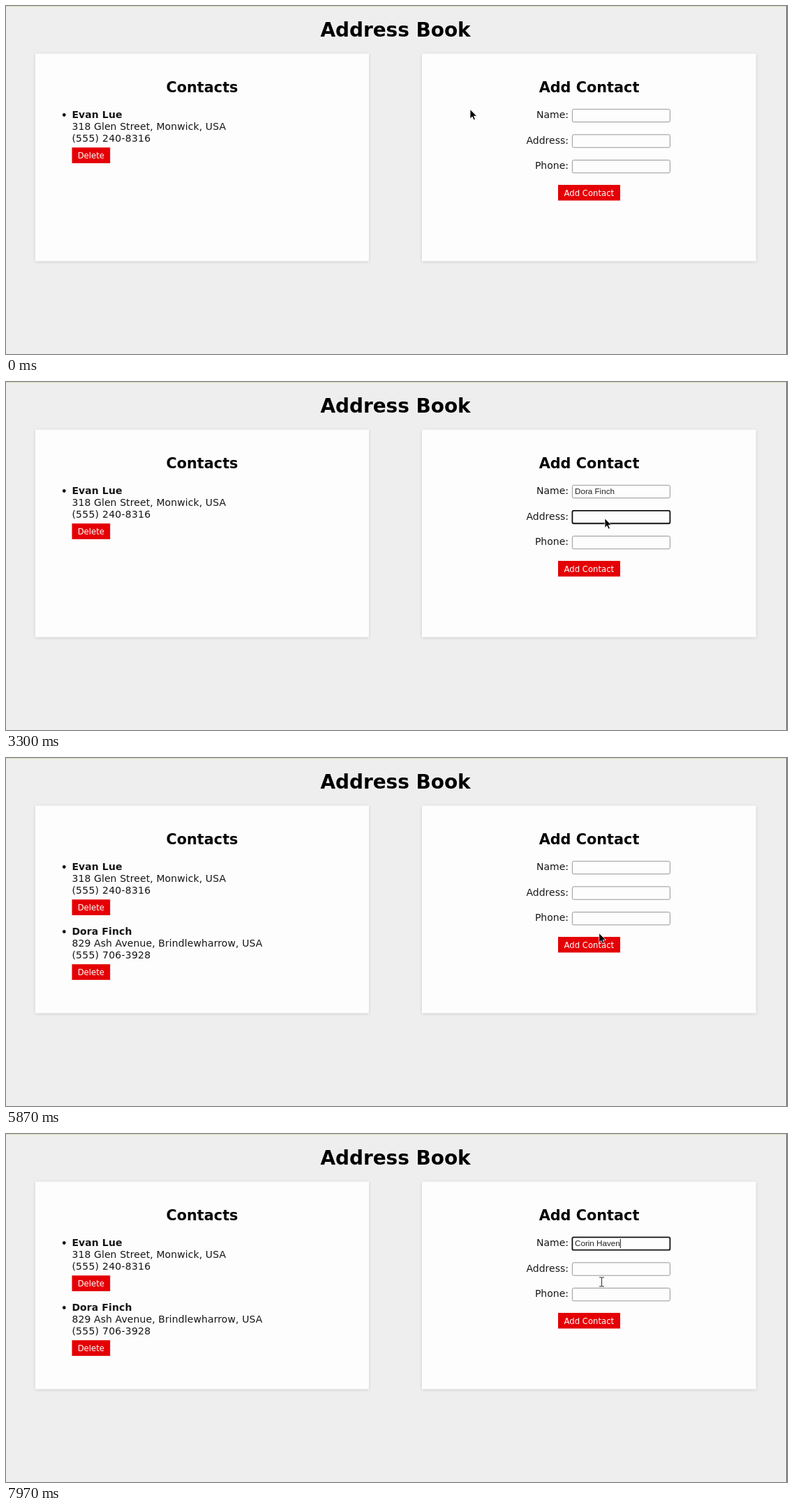
Write an HTML page that moves like this. It is 1119 by 500 pixels and loops after 8000 ms.

```html
<!DOCTYPE html>
<html lang="en">
<head>
<meta charset="utf-8">
<title>Address Book</title>
<style>
  html, body { margin: 0; width: 100%; height: 100%; overflow: hidden; background: #eee; }
  svg { display: block; width: 1119px; height: 500px; }
  text { font: 14px Verdana, "DejaVu Sans", sans-serif; fill: #161616; white-space: pre; }
  .h1 { font-size: 27.9px; font-weight: bold; fill: #000; text-anchor: middle; }
  .h2 { font-size: 20.8px; font-weight: bold; fill: #050505; text-anchor: middle; }
  .name { font-weight: bold; letter-spacing: .1px; }
  .street { letter-spacing: .1px; }
  .phone { letter-spacing: .25px; }
  .label { text-anchor: end; }
  .btn rect { fill: #e40005; }
  .btn text { font-size: 11.67px; fill: #fff; text-anchor: middle; }
  .card { fill: #fdfdfd; filter: drop-shadow(0 1.5px 2px rgba(0, 0, 0, .12)); }
  .box { fill: #fdfdfd; stroke: #8c8c90; stroke-width: .9; }
  .box.focus { stroke: #111; stroke-width: 1.8; }
  .value { font: 11.667px Arial, "Liberation Sans", sans-serif; fill: #222; }
</style>
</head>
<body>
<svg viewBox="0 0 1119 500">
  <defs>
    <clipPath id="inner"><rect x="814" y="140" width="134" height="110"/></clipPath>
  </defs>
  <rect width="1119" height="1" fill="#d8dbb6"/>
  <rect x="1118" width="1" height="500" fill="#5a5a5a"/>
  <text class="h1" x="558" y="44">Address Book</text>

  <rect class="card" x="42" y="68.5" width="478" height="298"/>
  <rect class="card" x="596" y="68.5" width="478.5" height="298"/>
  <text class="h2" x="281" y="124.3">Contacts</text>
  <text class="h2" x="835.5" y="124.3">Add Contact</text>

  <g id="list"></g>
  <g id="form"></g>
  <g class="btn"><rect x="791" y="257" width="89" height="22.5"/><text x="835.3" y="272.7">Add Contact</text></g>

  <rect id="caret" width="1" height="13" fill="#111"/>
  <path id="arrow" d="M0 0V13.4L3.1 10.6L5.2 15.2L7.4 14.2L5.3 9.7H9.6Z" fill="#000" stroke="#fff" stroke-width=".8"/>
  <path id="beam" d="M-3.5-6.5H-1L0-5.7L1-6.5H3.5M0-5.7V5.7M-3.5 6.5H-1L0 5.7L1 6.5H3.5" fill="none" stroke="#3a3a3a" stroke-width="1.1"/>
</svg>
<script>
const LOOP = 8000, SUBMIT = 5700, BEAM_FROM = 6120, BLINK = 500;
const $ = id => document.getElementById(id);

const contacts = [
  { name: "Evan Lue", street: "318 Glen Street, Monwick, USA", phone: "(555) 240-8316" },
  { name: "Dora Finch", street: "829 Ash Avenue, Brindlewharrow, USA", phone: "(555) 706-3928" }
];
const [, added] = contacts;

// Typed entries: field, text, first key, last key, cleared at
const entries = [
  { field: 0, text: added.name, from: 1980, to: 2550, until: SUBMIT },
  { field: 1, text: added.street, from: 3350, to: 4000, until: SUBMIT },
  { field: 2, text: added.phone, from: 4250, to: 4950, until: SUBMIT },
  { field: 0, text: "Corin Haven", from: 6950, to: 7650, until: LOOP }
];

// Focus changes: time, field (-1 for none)
const focuses = [[0, -1], [1400, 0], [2750, 1], [4130, 2], [SUBMIT, -1], [6200, 0]];

// Pointer path: time, x, y
const path = [
  [0, 665, 148.5], [250, 665, 148.5], [670, 669, 148.5], [800, 671, 148.5],
  [1350, 829.5, 153.5], [2500, 829.5, 153.5], [2720, 858, 196], [3950, 858, 196],
  [4110, 862, 232], [4950, 862, 232], [5330, 863.5, 250], [5600, 850, 263],
  [5800, 850, 263], [6150, 848, 157], [6250, 848, 157], [6470, 849.5, 173.5],
  [7000, 853.5, 212.5], [LOOP, 853.5, 212.5]
];

$("list").innerHTML = contacts.map((c, i) => `
  <g id="contact${i}" transform="translate(0 ${i * 93})">
    <circle cx="83.3" cy="156.5" r="2.4" fill="#111"/>
    <text class="name" x="94.4" y="161">${c.name}</text>
    <text class="street" x="94.4" y="178">${c.street}</text>
    <text class="phone" x="94.4" y="194.8">${c.phone}</text>
    <g class="btn"><rect x="94.5" y="203.3" width="54.7" height="22.5"/><text x="121.8" y="219.3">Delete</text></g>
  </g>`).join("");

const rowY = i => 148.3 + i * 36.55;
$("form").innerHTML = ["Name:", "Address:", "Phone:"].map((label, i) => `
  <text class="label" x="806" y="${rowY(i) + 12.7}">${label}</text>
  <rect class="box" x="811.4" y="${rowY(i)}" width="140" height="18.4" rx="2"/>
  <g clip-path="url(#inner)"><text class="value" x="815" y="${rowY(i) + 12.8}"></text></g>`).join("");
const boxes = document.querySelectorAll(".box");
const values = document.querySelectorAll(".value");

function pointerAt(t) {
  const i = Math.max(1, path.findIndex(p => p[0] >= t));
  const [t0, x0, y0] = path[i - 1], [t1, x1, y1] = path[i];
  const u = (t - t0) / (t1 - t0), k = u * u * (3 - 2 * u);
  return [x0 + (x1 - x0) * k, y0 + (y1 - y0) * k];
}

function typed(field, t) {
  const e = entries.find(e => e.field === field && t >= e.from && t < e.until);
  if (!e) return "";
  const u = Math.min(1, (t - e.from) / (e.to - e.from));
  return e.text.slice(0, 1 + Math.floor(u * (e.text.length - 1)));
}

function draw(t) {
  const [since, focus] = focuses.filter(f => f[0] <= t).pop();
  $("contact1").style.display = t >= SUBMIT ? "" : "none";

  let caretX = 815;
  values.forEach((el, i) => {
    const text = typed(i, t), active = i === focus;
    if (el.textContent !== text) el.textContent = text;
    const width = text ? el.getComputedTextLength() : 0;
    const x = active ? Math.min(815, 946.5 - width) : 815;
    el.setAttribute("x", x);
    boxes[i].classList.toggle("focus", active);
    if (active) caretX = x + width;
  });

  // Every key press restarts the blink
  const entry = entries.find(e => e.field === focus && e.from <= t && t < e.until);
  const lastKey = entry ? Math.min(t, entry.to) : since;
  const lit = focus >= 0 && Math.floor((t - lastKey) / BLINK) % 2 === 0;
  const caret = $("caret");
  caret.style.display = lit ? "" : "none";
  caret.setAttribute("x", caretX);
  caret.setAttribute("y", rowY(Math.max(0, focus)) + 2.6);

  const [x, y] = pointerAt(t), beam = t >= BEAM_FROM;
  for (const [id, on] of [["arrow", !beam], ["beam", beam]]) {
    $(id).style.display = on ? "" : "none";
    $(id).setAttribute("transform", `translate(${x} ${y})`);
  }
}

const start = performance.now();
function tick() {
  draw((performance.now() - start) % LOOP);
  requestAnimationFrame(tick);
}
tick();
</script>
</body>
</html>
```
